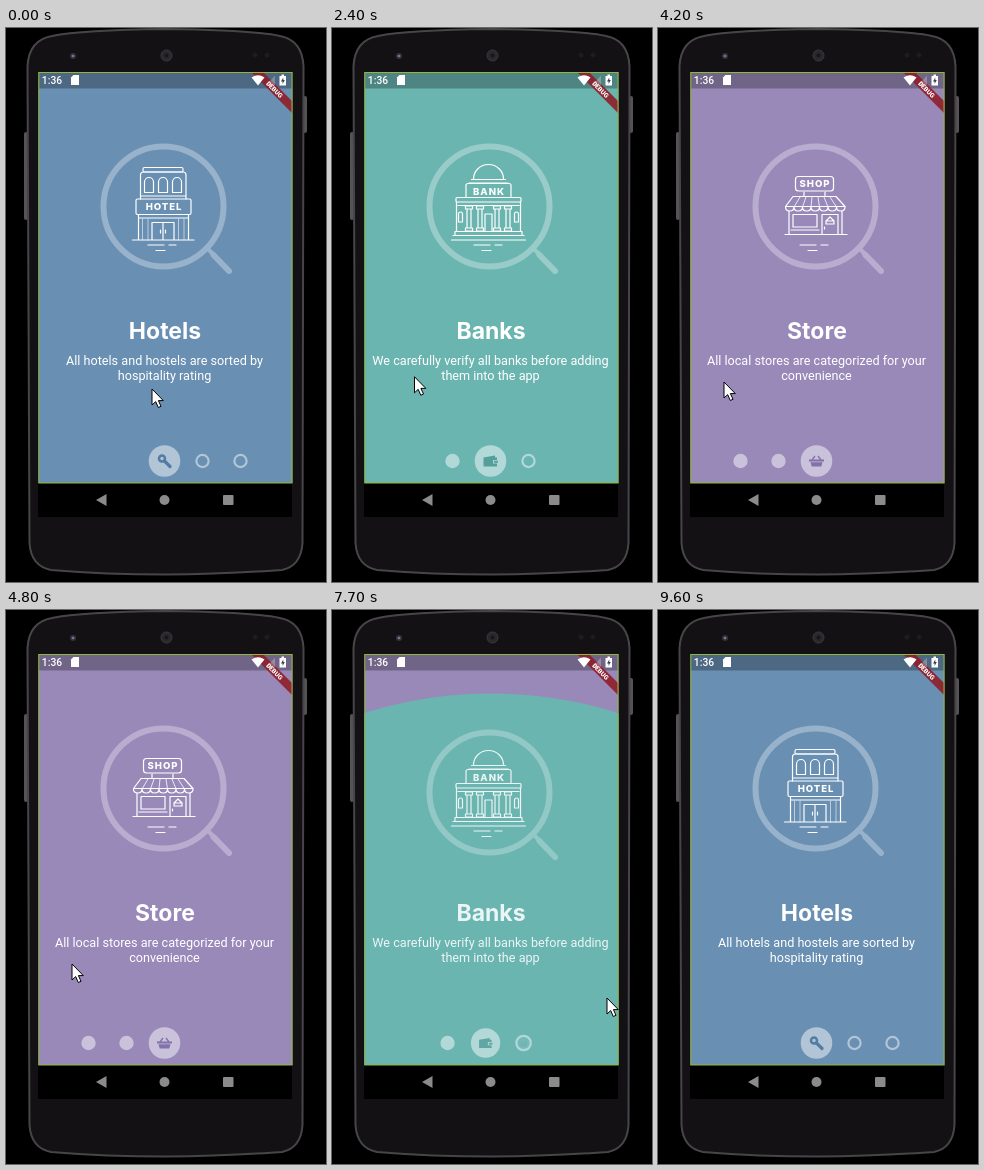
Animation of 320x554 px, one loop 9.7 s. Source, as an HTML page:

```html
<!DOCTYPE html>
<html lang="en">
<head>
<meta charset="utf-8">
<title>Onboarding reveal</title>
<style>
  html, body { margin: 0; width: 100%; height: 100%; overflow: hidden; background: #000; }
  svg { display: block; width: 320px; height: 554px; }
  text { text-anchor: middle; fill: #fff; }
  .title { font: 700 23px Inter, sans-serif; }
  .body { font: 12.65px Roboto, sans-serif; }
  .sign { font: 800 9.6px Inter, sans-serif; letter-spacing: .9px; }
  .line { fill: none; stroke: #fff; stroke-width: 1.2; stroke-linecap: round; stroke-linejoin: round; }
  .thin { stroke-width: .8; }
</style>
</head>
<body>
<svg viewBox="0 0 320 554">
  <defs>
    <clipPath id="screen"><rect x="32.500" y="44" width="254" height="411"/></clipPath>
    <clipPath id="reveal"><circle id="hole" cx="159" cy="502" r="0"/></clipPath>

    <g id="lens" fill="none" stroke="#fff" opacity=".31">
      <circle cx="157.500" cy="178.400" r="60" stroke-width="6"/>
      <path d="M201 220L208 227" stroke-width="4"/>
      <path d="M207.500 227L223 243" stroke-width="6" stroke-linecap="round"/>
    </g>
    <path id="ground" class="line" d="M142 217H158M163 217H170M150 222.500H159"/>

    <g id="art0">
      <g class="line">
        <rect x="137" y="139.500" width="40" height="4.500" rx="1.500"/>
        <path d="M134.500 171V147Q134.500 144 137.500 144H177Q180 144 180 147V171M135 168H180"/>
        <path d="M138.500 164.500V154a4.500 4.500 0 0 1 9 0V164.500ZM152.500 164.500V154a4.500 4.500 0 0 1 9 0V164.500ZM166.500 164.500V154a4.500 4.500 0 0 1 9 0V164.500Z"/>
        <rect x="130" y="171" width="55" height="15.500" rx="1.500"/>
        <path d="M132.500 187V212M182.500 187V212M126.500 212H188M133 190H182M146 212V194.500H168V212M157 194.500V212M154.500 202V205M159.500 202V205"/>
        <path class="thin" d="M136.500 191V212M142 191V212M172.500 191V212M178 191V212" opacity=".7"/>
      </g>
      <text class="sign" x="158" y="182.300">HOTEL</text>
    </g>

    <g id="column"><path class="line" d="M-3.500 178H3.500V181H-3.500ZM-2 181V200M2 181V200M-3.500 200H3.500V203H-3.500Z"/></g>
    <g id="art1">
      <g class="line">
        <path d="M141.500 151a15 14.500 0 0 1 30 0M139.500 151.500H173.500M137 155H176"/>
        <path d="M134 169.500V157.500Q134 155.500 136 155.500H177Q179 155.500 179 157.500V169.500"/>
        <rect x="124" y="169.500" width="65" height="4.500" rx="1"/>
        <path d="M126 177.500H187M124.500 174V203M188.500 174V203"/>
        <path d="M123 203.500H190M123 203.500V207.500M190 203.500V207.500M121 207.500H192M119.500 212H193.500"/>
        <path d="M126.500 194V186a2 2 0 0 1 4 0V194ZM182.500 194V186a2 2 0 0 1 4 0V194ZM153 203V186H160V203"/>
      </g>
      <use href="#column" x="137"/><use href="#column" x="148"/>
      <use href="#column" x="165"/><use href="#column" x="176"/>
      <text class="sign" x="157" y="167">BANK</text>
    </g>

    <g id="art2">
      <g class="line">
        <rect x="137.500" y="148.500" width="38" height="14.500" rx="3"/>
        <path d="M146 164V168M167 164V168M135 168.500H178L187 178.500H127.500Z"/>
        <path d="M127.500 179q0 4 4.250 4t4.250-4q0 4 4.250 4t4.250-4q0 4 4.250 4t4.250-4q0 4 4.250 4t4.250-4q0 4 4.250 4t4.250-4q0 4 4.250 4t4.250-4q0 4 4.250 4t4.250-4"/>
        <path class="thin" d="M142 169L136 179M148 169L144.500 179M154 169L153 179M160 169L161.500 179M166 169L170 179M172 169L178.500 179"/>
        <path d="M131 183V206M184 183V206M127 206.500H189M135 186.500H159V199H135ZM133 202H161M164 206V186.500H180V206M168 193L172 189L176 193M168 193H176V196H168ZM166.500 199V201"/>
      </g>
      <text class="sign" x="157" y="159.200">SHOP</text>
    </g>
  </defs>

  <!-- Handset -->
  <rect width="320" height="554"/>
  <rect x="18" y="104" width="4" height="88" rx="2" fill="#555356"/>
  <rect x="297" y="68" width="4" height="37" rx="2" fill="#555356"/>
  <path d="M160 1Q245 2 274 8Q296 12 297.500 38L296.500 515Q295 538 276 542Q215 546.500 160 546.500Q100 546.500 45 542Q25 538 23.500 515L21.500 38Q23 12 46 8Q75 2 160 1Z" fill="#131114" stroke="#474548" stroke-width="2"/>
  <circle cx="160.500" cy="27.500" r="5.500" fill="#29282c" stroke="#3c3a3f"/>
  <circle cx="160.500" cy="27.500" r="2" fill="#17161a"/>
  <circle cx="67" cy="28" r="3" fill="#34333d"/>
  <circle cx="67" cy="28" r="1.300" fill="#77798c"/>
  <g fill="#1e1c20"><circle cx="249" cy="27" r="2.500"/><circle cx="261" cy="27" r="2.500"/></g>
  <rect x="32" y="455" width="254" height="34"/>
  <g fill="#8b8b8b">
    <path d="M90 472L100.500 466V478Z"/>
    <circle cx="158.500" cy="472" r="5"/>
    <rect x="217" y="467" width="10.500" height="10" rx="1"/>
  </g>

  <g clip-path="url(#screen)">
    <g id="back"></g>
    <g id="front" clip-path="url(#reveal)"></g>
    <g id="pager"></g>
    <rect x="32" y="44" width="255" height="16.500" fill-opacity=".27"/>
    <g transform="translate(268.500 61.500) rotate(45)">
      <rect x="-30" y="-4.200" width="60" height="8.400" fill="#8f1f2b" fill-opacity=".9"/>
      <text y="2.300" style="font:900 6.400px Roboto,sans-serif">DEBUG</text>
    </g>
    <text x="46" y="56" style="font:500 10.300px Roboto,sans-serif">1:36</text>
    <g fill="#fff">
      <path d="M67.500 47H73V57H65V49.500Z"/>
      <path d="M245.500 49.500Q252 45 258.500 49.500L252 57.500Z"/>
      <path d="M269 47.500V57.500H260Z" fill-opacity=".25"/>
      <path d="M275.500 46.500H278V48H280V57.500H273.500V48H275.500Z"/>
    </g>
    <path d="M277.300 49.500L275 53.500H276.600V56L278.800 52H277.300Z" fill="#35424e"/>
  </g>
  <rect x="32.800" y="44.500" width="253.200" height="410.500" fill="none" stroke="#91b83c"/>
  <path id="cursor" d="M0 0V16L3.700 12.600L6.300 18.500L9 17.300L6.400 11.600H11.300Z" fill="#fff" stroke="#000" stroke-linejoin="round"/>
</svg>
<script>
const LOOP = 9700, STEP = 100, DRAG = 185, REACH = 481, GAP = 38;
const $ = id => document.getElementById(id);
const lerp = (a, b, k) => a + (b - a) * k;

const pages = [
  { color: '#698fb2', ink: '#527ca4', title: 'Hotels',
    lines: ['All hotels and hostels are sorted by', 'hospitality rating'],
    icon: '<circle cx="-2.500" cy="-2.500" r="3" fill="none" stroke="currentColor" stroke-width="2.500"/><path d="M0 0L5.500 5.500" stroke="currentColor" stroke-width="3.200" stroke-linecap="round"/>' },
  { color: '#6bb5b1', ink: '#559f9b', title: 'Banks',
    lines: ['We carefully verify all banks before adding', 'them into the app'],
    icon: '<path d="M-7 -3.500L4.500 -5.500V-3.500H6.500V-1H2.500V2.500H6.500V5.500H-7Z" fill="currentColor"/><path d="M3.500 -.200H7.500V1.700H3.500Z" fill="currentColor"/>' },
  { color: '#9989b9', ink: '#8272a8', title: 'Store',
    lines: ['All local stores are categorized for your', 'convenience'],
    icon: '<path d="M-7.500 -1.500H7.500V.500H-7.500ZM-6 1.300H6L4.800 5.500H-4.800Z" fill="currentColor"/><path d="M-4.500 -1L-1.500 -5M4.500 -1L1.500 -5" stroke="currentColor" stroke-width="1.400"/>' }
];

// Pointer path: time, x, y
const path = [
  [0, 146, 361], [300, 199, 350], [900, 110, 340], [1600, 149, 329],
  [2100, 60, 345], [2500, 90, 350], [3000, 190, 352], [3400, 219, 354],
  [3500, 219, 354], [4000, 83, 354], [4100, 66, 354], [4900, 66, 354],
  [5500, 110, 368], [6100, 150, 378], [6600, 135, 370], [7000, 104, 358],
  [7100, 114, 362], [7700, 275, 388], [7900, 285, 392], [8100, 260, 402],
  [8600, 110, 385], [9000, 200, 380], [9200, 240, 378], [9500, 262, 376]
];
// Drags: press time, release time, page left, page entered
const drags = [[300, 2100, 0, 1], [3500, 4100, 1, 2], [7100, 7900, 2, 1], [8600, 9200, 1, 0]];

function pointer(t) {
  const i = path.findIndex(p => p[0] > t);
  if (i < 0) return path[path.length - 1].slice(1);
  const a = path[i - 1], b = path[i], k = (t - a[0]) / (b[0] - a[0]);
  return [lerp(a[1], b[1], k), lerp(a[2], b[2], k)];
}

// The released page finishes at a fixed speed
function slideAt(t) {
  let from = 0, to = 0, p = 0;
  for (const [down, up, a, b] of drags) {
    if (t < down) break;
    const moved = Math.abs(pointer(Math.min(t, up))[0] - pointer(down)[0]) / DRAG;
    p = Math.min(1, moved + Math.max(0, t - up) * .005);
    from = a;
    to = b;
  }
  return p >= 1 ? { from: to, to, p: 0 } : { from, to, p };
}

const pageMarkup = (i, p) => {
  const { color, title, lines } = pages[i];
  return `<rect x="32" y="44" width="255" height="411" fill="${color}"/><g opacity="${p}">
    <g transform="translate(0 ${31 * (1 - p)})"><use href="#lens"/><use href="#art${i}"/><use href="#ground"/></g>
    <text class="title" x="159" y="311">${title}</text>
    <text class="body" x="158.500" y="336.500">${lines[0]}</text>
    <text class="body" x="158.500" y="351.500">${lines[1]}</text></g>`;
};

function pagerMarkup({ from, to, p }) {
  const shift = lerp(from, to, p);
  return pages.map(({ ink, icon }, i) => {
    const on = Math.max(0, 1 - Math.abs(i - shift));
    const hollow = i > from || (i === from && to < from);
    const r = lerp(7.2, 15.8, on);
    const fill = hollow && p ? .48 * on : hollow ? 0 : .48;
    const ring = hollow ? .48 * (1 - on) : 0;
    return `<g transform="translate(${158.500 + (i - shift) * GAP} 433)">
      <circle r="${r}" fill="#fff" fill-opacity="${fill}"/>
      <circle r="${r - 1.1}" fill="none" stroke="#fff" stroke-opacity="${ring}" stroke-width="2.200"/>
      <g transform="scale(${r / 15.8})" color="${ink}" opacity="${on}">${icon}</g></g>`;
  }).join('');
}

let last = -1;
function draw(now) {
  const t = Math.floor(now % LOOP / STEP) * STEP;
  if (t !== last) {
    last = t;
    const s = slideAt(t), [x, y] = pointer(t);
    $('back').innerHTML = pageMarkup(s.from, 1);
    $('front').innerHTML = s.p ? pageMarkup(s.to, s.p) : '';
    $('hole').setAttribute('r', s.p * REACH);
    $('pager').innerHTML = pagerMarkup(s);
    $('cursor').setAttribute('transform', `translate(${x} ${y})`);
    $('cursor').style.display = t < 9500 ? '' : 'none';
  }
  requestAnimationFrame(tick);
}
const start = performance.now();
const tick = () => draw(performance.now() - start);
tick();
</script>
</body>
</html>
```
